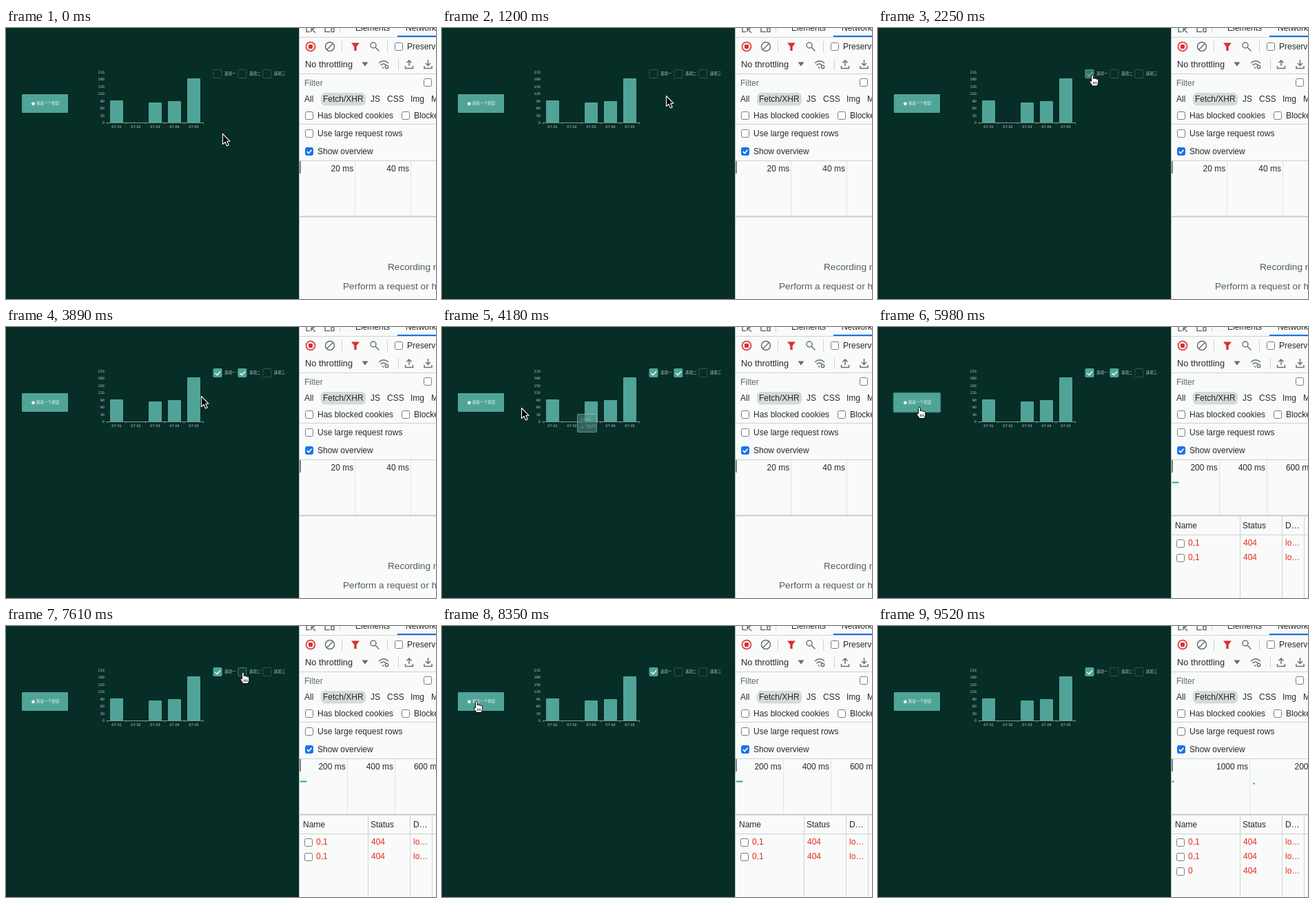
Animation of 624x393 px, one loop 9.86 s. Source, as an HTML page:

```html
<!DOCTYPE html>
<html lang="zh">
<head>
<meta charset="utf-8">
<title>Dashboard and network panel</title>
<style>
  html, body { margin: 0; width: 100%; height: 100%; overflow: hidden; background: #062d26; }
  svg { display: block; width: 624px; height: 393px; }
  .ui { font: 12px "Liberation Sans", Arial, sans-serif; fill: #27292b; }
  .cn { font: 5.5px "Noto Sans CJK SC", "Noto Sans CJK", sans-serif; fill: #c3d2ce; }
  .num { font: 5px "DejaVu Sans", sans-serif; fill: #c3d2ce; }
  .red { fill: #ea2a20; }
  .rule { stroke: #cdd1d0; fill: none; }
  .icon { stroke: #6b7074; stroke-width: 1.5; fill: none; }
  .box { fill: #fff; stroke: #777b7e; }
  .teal { fill: #50a497; }
</style>
</head>
<body>
<svg viewBox="0 0 624 393">
  <rect width="624" height="393" fill="#062d26"/>

  <rect id="glow" x="22.5" y="95.5" width="68" height="28" rx="2" fill="none" stroke="#50a497" stroke-width="1.5"/>
  <rect class="teal" x="23" y="96" width="67" height="27" rx="1"/>
  <path fill="#fff" d="M39.5 106.4l1 2 2.2.3-1.6 1.5.4 2.2-2-1-2 1 .4-2.2-1.6-1.5 2.2-.3z"/>
  <text class="cn" x="44" y="111.4" style="fill:#eaf5f2">我是一个按钮</text>

  <g id="chart"></g>
  <g id="options"></g>
  <g id="tooltip">
    <rect x="196.5" y="126.5" width="28" height="26" rx="1" fill="#4f8c82" fill-opacity=".9" stroke="#9fc4bd"/>
    <text class="num" x="201" y="136">07-01</text>
    <circle class="teal" cx="203.5" cy="145" r="2"/>
    <text class="num" x="212" y="147">92</text>
  </g>

  <g class="ui">
    <rect x="425.5" width="199" height="393" fill="#f9fbfa"/>
    <path class="rule" d="M426 13.5H624M426 66.5H624M426 139.5H624M426 192.5H624M487.5 19V35M553.5 19V35M569.5 45V61M484.5 0V7"/>
    <path d="M425.5 0V393" stroke="#aab5b2"/>
    <g class="icon">
      <path d="M436 0V5.5H441M443 1l6 6M443 1V6M443 1H448M463 0V5.5H470M472 0H476V5.5H472Z"/>
      <circle cx="470" cy="27" r="6.5"/><path d="M465.5 31.5l9-9"/>
      <circle cx="533" cy="25" r="4"/><path d="M536 28l5.5 5.5"/>
      <path d="M541 51q7-6.5 14 0M543.5 54q4.5-4 8 0M546 56.5l2 2"/>
      <circle cx="552.5" cy="56.5" r="2.2"/>
      <path d="M585 55V47M581.5 50.5l3.5-3.5 3.5 3.5M579.5 55V58.500H590.500V55"/>
      <path d="M612.500 46V54M609 51l3.500 3.500 3.500-3.500M607 55V58.500H618V55"/>
    </g>
    <circle cx="442" cy="27" r="6.500" fill="none" stroke="#d93030" stroke-width="1.600"/>
    <rect x="439" y="24" width="6" height="6" rx="1" fill="#d93030"/>
    <path d="M501 21.500H513L508.700 27V33H505.300V27Z" fill="#d93030"/>
    <path d="M516.500 49.500H525.500L521 55.500Z" fill="#666a6d"/>
    <rect x="568" y="11" width="56" height="2" fill="#1a73e8"/>
    <rect x="457" y="94" width="65" height="18.500" rx="6" fill="#d5dbda"/>
    <g id="labels"></g>
    <g id="overview"></g>
    <rect x="426" y="193" width="2" height="18" fill="#7c8283"/>
    <path d="M426 273.500H624" stroke="#c7cccb" stroke-width="2"/>
    <g id="empty" font-size="13.600" style="fill:#55595c">
      <text x="554" y="351">Recording network activity…</text>
      <text x="489" y="379">Perform a request or hit</text>
    </g>
    <g id="table"></g>
  </g>

  <g id="arrow">
    <path d="M.5.500V15.500L4 12.300 6.500 18 9.200 16.800 6.700 11.300H11Z" fill="#000" stroke="#fff" stroke-width="1.100" stroke-linejoin="round"/>
  </g>
  <g id="hand">
    <path d="M-1.500 1.500C-1.500-.2 1.300-.2 1.300 1.500V6C1.500 4.700 4 4.800 4 6.300 4.500 5.300 6.500 5.600 6.500 7 7.200 6.200 8.800 6.700 8.800 8V11.500C8.800 13 7.700 14 7.500 16.500H-.3C-.6 14.500-2.300 13.300-3.500 11-4.500 9.200-3.300 8-1.500 10Z" fill="#fff" stroke="#000" stroke-linejoin="round"/>
    <path d="M1.500 10.500V14M3.700 10.500V14M5.900 10.500V14" stroke="#000" stroke-width=".8"/>
  </g>
</svg>
<script>
const LOOP = 9860;
const $ = id => document.getElementById(id);
const text = (x, y, s, attrs = '') => `<text x="${x}" y="${y}" ${attrs}>${s}</text>`;
const box = (x, y, attrs = 'class="box"') =>
  `<rect x="${x}" y="${y}" width="11" height="11" rx="2" ${attrs}/>`;
const show = (id, on) => $(id).setAttribute('visibility', on ? 'visible' : 'hidden');

function drawChart() {
  const tops = [105, 137, 108, 106, 73];
  let out = '<path d="M146 137.5H287" stroke="#9db3ad" stroke-width=".8"/>';
  for (let i = 0; i < 8; i++)
    out += text(143, 66 + i * 10.43, 210 - i * 30, 'class="num" text-anchor="end"');
  tops.forEach((top, i) => {
    const x = 151 + i * 28;
    out += `<rect class="teal" x="${x}" y="${top}" width="19" height="${137 - top}" rx="1"/>`;
    out += text(x + 9.5, 145.2, '07-0' + (i + 1), 'class="num" text-anchor="middle"');
  });
  for (let i = 0; i < 6; i++)
    out += `<path d="M${146.500 + i * 28} 137.500v2" stroke="#9db3ad" stroke-width=".6"/>`;
  $('chart').innerHTML = out;
}

function drawOptions() {
  $('options').innerHTML = [...'一二三'].map((n, i) => {
    const x = 301 + i * 35.900;
    return `<rect id="opt${i}" x="${x}" y="60.500" width="12" height="12" rx="1"/>
      <path id="tick${i}" d="M${x + 2.500} 66.800l2.800 2.900 4.900-5.400" fill="none" stroke="#fff" stroke-width="1.300"/>` +
      text(x + 16, 68, '选项' + n, 'class="cn"');
  }).join('');
}

function drawLabels() {
  const rows = [
    [507, 4, 'Elements'], [580, 4, 'Network'], [582, 31, 'Preserve log'],
    [433, 107, 'All'], [460, 107, 'Fetch/XHR'], [529, 107, 'JS'], [553, 107, 'CSS'],
    [587, 107, 'Img'], [617, 107, 'Media'], [452, 131, 'Has blocked cookies'],
    [592, 131, 'Blocked'], [452, 157, 'Use large request rows'], [452, 183, 'Show overview']
  ];
  $('labels').innerHTML = rows.map(r => text(...r)).join('') +
    text(434, 57, 'No throttling', 'font-size="12.800"') +
    text(433, 83.500, 'Filter', 'style="fill:#62676a"') +
    box(564.500, 21.500) + box(606.500, 73.500) + box(434.500, 121.500) + box(574.500, 121.500) +
    box(434.500, 147.500) + box(434.500, 173.500, 'fill="#1a73e8" stroke="#1a73e8"') +
    '<path d="M436.800 179.200l2.400 2.500 4.300-5" fill="none" stroke="#fff" stroke-width="1.700"/>';
}

const bar = (x, y, w, color) => `<rect x="${x}" y="${y}" width="${w}" height="2" fill="${color}"/>`;
const overviews = [
  { step: 80.750, unit: 20, marks: '' },
  { step: 69.250, unit: 200, marks: bar(427, 224.500, 9.500, '#2bb364') },
  { step: 113.500, unit: 1000, marks: bar(426.500, 224.500, 3, '#2aa58c') + bar(544.500, 227.500, 2.500, '#2aa58c') }
];

function drawOverview({ step, unit, marks }) {
  let out = marks;
  for (let i = 1; i < 4; i++) {
    const x = 426 + i * step;
    out += `<path class="rule" d="M${Math.floor(x) + .5} 193V273" style="stroke:#e1e4e3"/>` +
      text(x - 2.500, 208, unit * i + ' ms', 'text-anchor="end"');
  }
  $('overview').innerHTML = out;
}

function drawTable(names) {
  let out = '<path class="rule" d="M426 301.500H624M525.500 275V393M586.500 275V393M618.500 275V393"/>' +
    text(431, 292, 'Name') + text(529, 292, 'Status') + text(591, 292, 'D…');
  names.forEach((name, i) => {
    const y = 317 + i * 21;
    out += box(433.500, y - 8.500) + text(450, y, name, 'class="red"') +
      text(530, y, '404', 'class="red"') + text(591, y, 'lo…', 'class="red"');
  });
  $('table').innerHTML = out;
}

// Cursor stops: time, x, y, shape
const cursor = [
  [0, 314, 153, 'arrow'], [450, 316, 158, 'arrow'], [600, 321, 164, 'arrow'],
  [750, 329, 163, 'arrow'], [900, 334, 152, 'arrow'], [1050, 331, 129, 'arrow'],
  [1200, 325, 98, 'arrow'], [1350, 319, 71, 'arrow'], [1500, 312, 70, 'hand'],
  [1650, 311, 67.500, 'hand'], [2550, 333, 67, 'hand'], [2700, 372, 67, 'hand'],
  [2850, 358, 67, 'hand'], [3000, 348, 67, 'hand'], [3740, 326, 82, 'arrow'],
  [3890, 283, 100, 'arrow'], [4030, 196, 113, 'arrow'], [4180, 115, 117, 'arrow'],
  [4330, 72, 116, 'hand'], [4480, 62, 116, 'hand'], [4630, 60, 116, 'hand'],
  [6580, 106, 114, 'arrow'], [6870, 180, 96, 'arrow'], [7020, 290, 78, 'arrow'],
  [7170, 372, 67, 'hand'], [7310, 350, 67, 'hand'], [7460, 344, 67, 'hand'],
  [7760, 325, 74, 'arrow'], [7910, 245, 72, 'arrow'], [8060, 140, 92, 'arrow'],
  [8210, 72, 106, 'hand'], [8350, 50, 109, 'hand'], [9090, 150, 150, 'arrow'],
  [9230, 380, 250, 'arrow'], [9380, 570, 350, 'arrow'], [9520, 0, 0, 'none']
];
const looks = {
  off: ['#062d26', '#31564e', 0], hover: ['#0d3c36', '#3f8177', 0],
  half: ['#39786e', '#50a497', .4], on: ['#50a497', '#50a497', 1]
};
const options = [
  [[0, 'off'], [1500, 'hover'], [2250, 'half'], [2400, 'on']],
  [[0, 'off'], [3000, 'hover'], [3140, 'half'], [3290, 'on'], [7460, 'half'], [7610, 'hover'], [7760, 'off']],
  [[0, 'off'], [2700, 'hover'], [2850, 'off'], [7170, 'hover'], [7310, 'off']]
];
const network = [[0, 0, []], [5080, 1, ['0,1']], [5980, 1, ['0,1', '0,1']], [8950, 2, ['0,1', '0,1', '0']]];
const tooltip = [[0, 0], [4030, 1], [4180, .65], [4330, 0]];
const glow = [[0, 0], [4930, .7], [5080, .35], [5230, 0], [5980, .7], [6130, .35], [6280, 0], [8650, .7], [8800, .35], [8950, 0]];

const at = (stops, t) => stops.findLast(s => s[0] <= t);
let panel;

function render() {
  const t = performance.now() % LOOP;
  const [, x, y, shape] = at(cursor, t);
  for (const id of ['arrow', 'hand']) {
    show(id, id === shape);
    $(id).setAttribute('transform', `translate(${x} ${y})`);
  }
  options.forEach((stops, i) => {
    const [fill, stroke, tick] = looks[at(stops, t)[1]];
    $('opt' + i).setAttribute('fill', fill);
    $('opt' + i).setAttribute('stroke', stroke);
    $('tick' + i).setAttribute('opacity', tick);
  });
  $('tooltip').setAttribute('opacity', at(tooltip, t)[1]);
  $('glow').setAttribute('opacity', at(glow, t)[1]);

  const next = at(network, t);
  if (next !== panel) {
    panel = next;
    const [, view, names] = panel;
    drawOverview(overviews[view]);
    drawTable(names);
    show('empty', !names.length);
    show('table', names.length);
  }
  requestAnimationFrame(render);
}

drawChart();
drawOptions();
drawLabels();
render();
</script>
</body>
</html>
```
